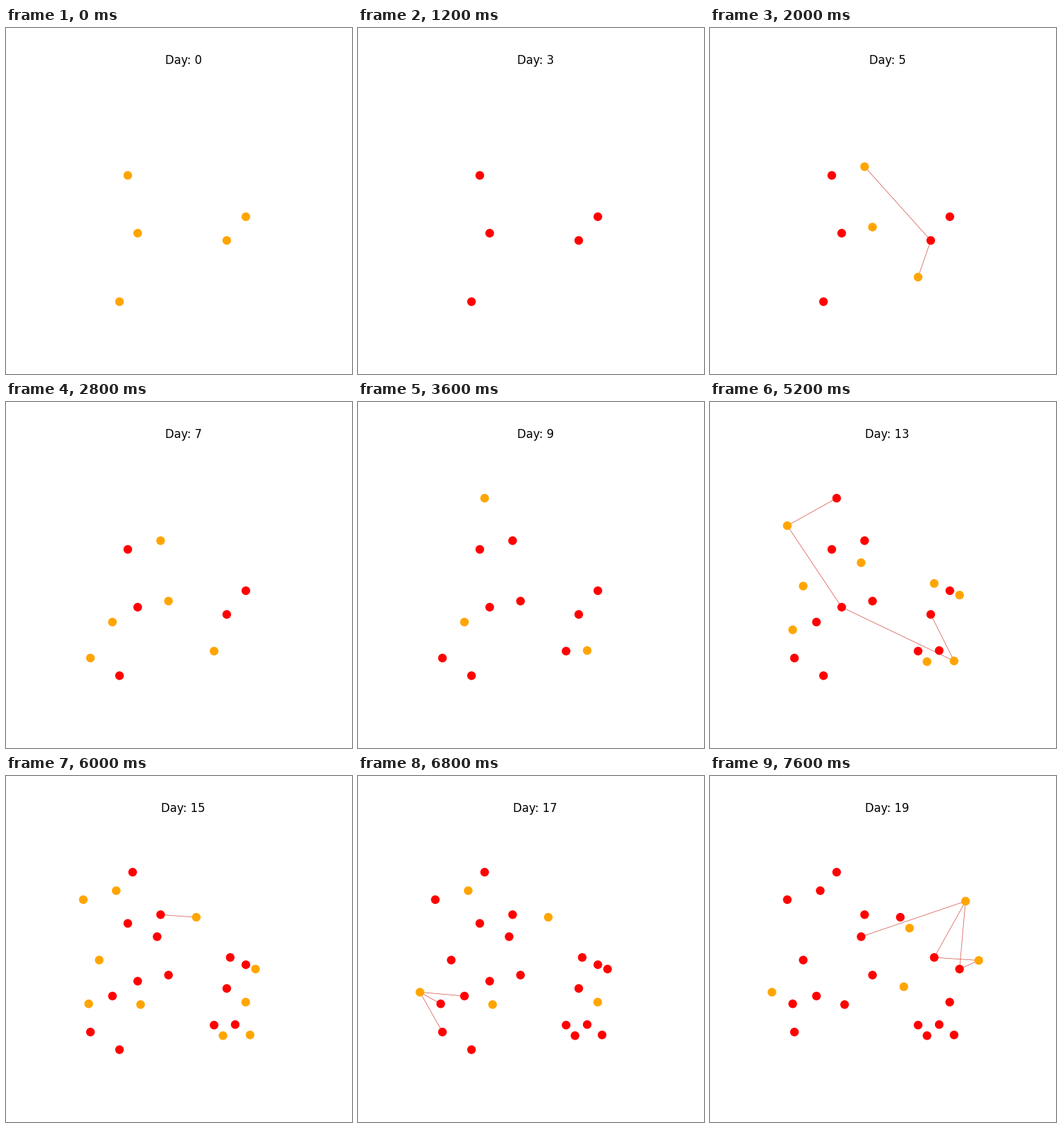
Animation of 500x500 px, one loop 8000 ms. Source, as a matplotlib script:

```python
import matplotlib.pyplot as plt
from matplotlib.animation import FuncAnimation
from matplotlib.collections import LineCollection

DAYS, DAY_MS = 20, 400
ORANGE, RED, LINK = "#ffa500", "#ff0000", "#d2483e"
NEVER = 99

# name: (x, y, day infected, day infectious, day removed, infected by)
CASES = {
    "A": (176, 213, 0, 3, 19, ""),
    "B": (190.3, 296.5, 0, 3, 19, ""),
    "C": (164, 395.5, 0, 3, 19, ""),
    "D": (319, 307, 0, 3, 19, ""),
    "E": (346.6, 272.7, 0, 3, 19, ""),
    "R": (234.8, 287.7, 4, 8, NEVER, "BD"),
    "P": (223.4, 200.4, 5, 9, NEVER, "D"),
    "Q": (300.7, 360, 5, 9, NEVER, "D"),
    "U": (122, 370, 6, 9, NEVER, "C"),
    "W": (153.8, 318, 6, 10, NEVER, "B"),
    "V": (183, 139, 8, 12, NEVER, "A"),
    "X": (331.2, 359.2, 8, 12, NEVER, "D"),
    "H": (324, 262.2, 10, 14, NEVER, "DE"),
    "G": (218.4, 232.2, 11, 15, NEVER, "A"),
    "I": (134.7, 266, 12, 16, NEVER, "B"),
    "J": (119.5, 329.2, 12, 16, NEVER, "W"),
    "K": (360.6, 279, 12, 16, NEVER, "E"),
    "L": (313.6, 375.2, 12, 16, NEVER, "Q"),
    "Y": (111.7, 178.7, 13, 17, NEVER, "VB"),
    "Z": (352.7, 374.2, 13, 17, NEVER, "BD"),
    "M": (159.3, 165.7, 14, 18, NEVER, "V"),
    "S": (194.5, 330.3, 14, 18, NEVER, "C"),
    "T": (346.4, 326.8, 14, 18, NEVER, "E"),
    "N": (275, 204.1, 15, 19, NEVER, "P"),
    "O": (89.5, 312.4, 17, 21, NEVER, "WJU"),
    "c": (288.4, 219.8, 18, 22, NEVER, "K"),
    "d": (280.1, 304.5, 18, 22, NEVER, "D"),
    "a": (369.3, 180.9, 19, 23, NEVER, "GHK"),
    "b": (388.4, 266.5, 19, 23, NEVER, "HK"),
}

fig, ax = plt.subplots(figsize=(5, 5), dpi=100)
ax.axis("off")
ax.set_xlim(62.5, 450)  # data units are stage pixels
ax.set_ylim(445, 60)
title = ax.set_title("Day: 0")
links = LineCollection([], colors=LINK, linewidths=0.5, zorder=1)
ax.add_collection(links, autolim=False)
dots = ax.scatter([], [], s=81, linewidths=0, zorder=2)


def position(name):
    return CASES[name][:2]


def draw(day):
    points, colors, segments = [], [], []
    for name, (x, y, start, infectious, removed, sources) in CASES.items():
        if not start <= day < removed:
            continue
        points.append((x, y))
        colors.append(RED if day >= infectious else ORANGE)
        if day == start:
            segments += [(position(source), (x, y)) for source in sources]
    dots.set_offsets(points)
    dots.set_facecolors(colors)
    links.set_segments(segments)
    title.set_text(f"Day: {day}")
    return dots, links, title


anim = FuncAnimation(fig, draw, frames=DAYS, init_func=lambda: draw(0),
                     interval=DAY_MS, repeat=True, repeat_delay=0)
plt.show()
```
